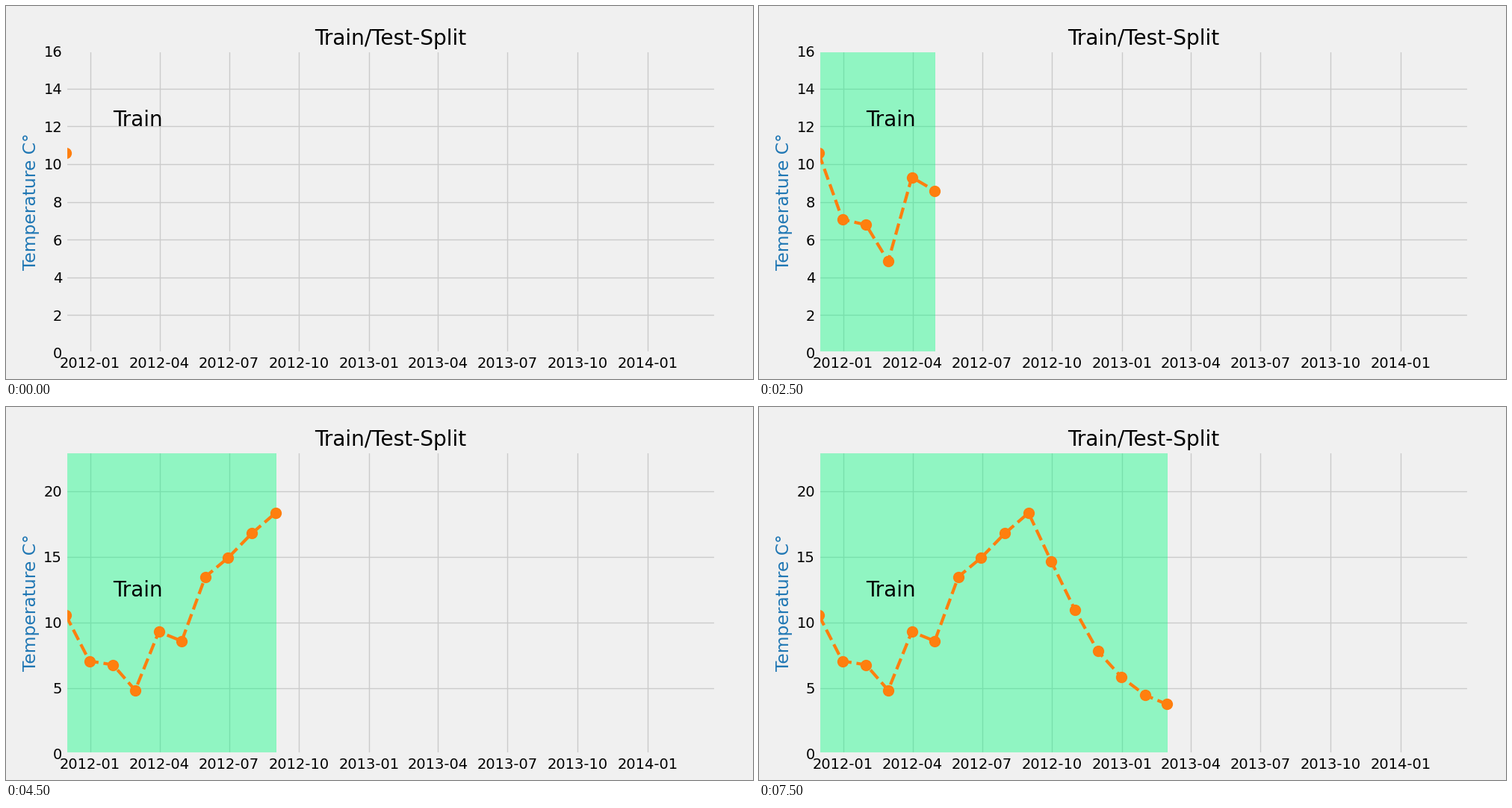
Recreate the animation shown at these times as a matplotlib script. Size 1000 px wide and 500 px high, loop 8000 ms.

```python
import numpy as np
import matplotlib.pyplot as plt
import matplotlib.dates as mdates
from matplotlib.animation import FuncAnimation

plt.style.use("fivethirtyeight")

STEP_MS = 500
TEMPS = np.array([10.57, 7.07, 6.78, 4.85, 9.30, 8.59, 13.48, 14.94,
                  16.79, 18.34, 14.63, 10.94, 7.81, 5.83, 4.47, 3.79])


def day(text):
    return mdates.date2num(np.datetime64(text))


# One reading at the end of each month, from November 2011 on
first = np.datetime64("2011-12", "M")
months = first + np.arange(len(TEMPS))
days = mdates.date2num(months.astype("datetime64[D]") - 1)

fig, ax = plt.subplots(figsize=(10, 5), dpi=100)
ax.set_title("Train/Test-Split", color="black")
ax.set_ylabel("Temperature C°", color="tab:blue")
ax.set_xlim(days[0], day("2014-03-31"))
ax.xaxis.set_major_locator(mdates.MonthLocator((1, 4, 7, 10)))
ax.xaxis.set_major_formatter(mdates.DateFormatter("%Y-%m"))

span = ax.axvspan(days[0], days[0], color="springgreen", alpha=0.4)
line, = ax.plot([], [], "--o", color="tab:orange", lw=3, markersize=10)
ax.text(day("2012-01-31"), 12, "Train", fontsize=20, color="black")


def update(i):
    line.set_data(days[:i + 1], TEMPS[:i + 1])
    span.set_width(days[i] - days[0])
    # Headroom of five degrees above the rounded peak so far
    ax.set_ylim(0, round(TEMPS[:i + 1].max()) + 5)
    return line, span


anim = FuncAnimation(fig, update, frames=len(TEMPS), interval=STEP_MS,
                     init_func=lambda: update(0), repeat=True,
                     repeat_delay=0, blit=False)
plt.show()
```
